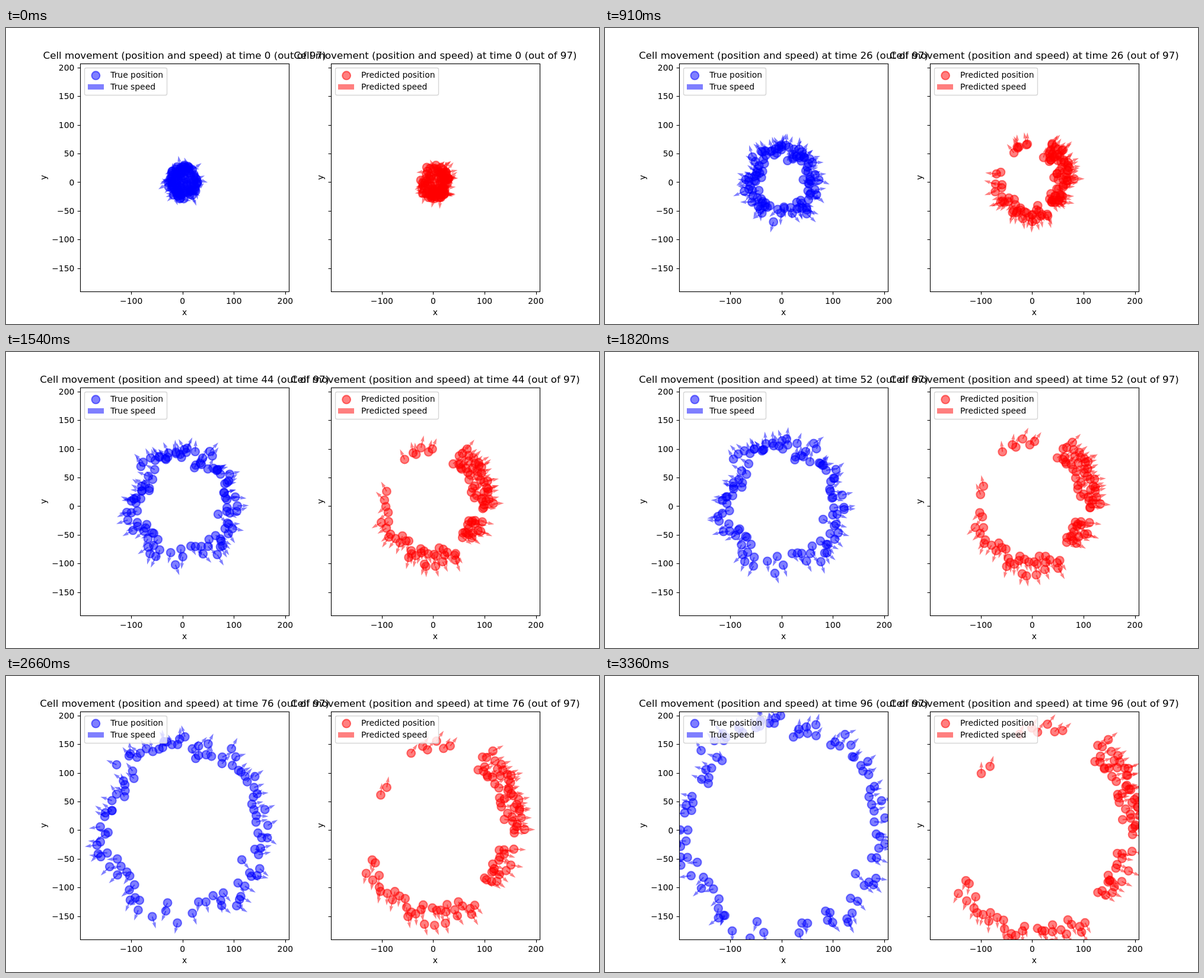
An HTML page with a canvas that plays this animation: 1000x500 px, repeating every 3390 ms.

```html
<!DOCTYPE html>
<html lang="en">
<head>
<meta charset="utf-8">
<title>Cell movement</title>
<style>
  html, body { margin: 0; width: 100%; height: 100%; overflow: hidden; background: #fff; }
  canvas { display: block; }
</style>
</head>
<body>
<canvas id="stage" width="1000" height="500"></canvas>
<script>
const ctx = document.getElementById('stage').getContext('2d');
const LOOP = 3390, STEP = 35, LAST = 96;
const REF = 67, SPEED = 1.88;             // sectors describe the swarm at step REF
const SX = 0.8655, SY = 0.9675, Y0 = 260.4;
const TOP = 60, BOTTOM = 445, WIDTH = 352.27;
const RAD = Math.PI / 180;

const panels = [
  {
    left: 125, x0: 297.7, rgb: '0,0,255', kind: 'True', legendWidth: 139, labels: true,
    seed: 7, wander: 0.35, heading: angle => angle,
    sectors: [
      { from: -65, to: 240, count: 93, near: 110, far: 156 },
      { from: -118, to: -67, count: 7, near: 112, far: 148 }
    ]
  },
  {
    left: 547.73, x0: 720.4, rgb: '255,0,0', kind: 'Predicted', legendWidth: 174, labels: false,
    seed: 21, wander: 0.12, heading: angle => angle > 0 ? 0.52 * angle : angle * (1 + angle / 8.4),
    sectors: [
      { from: -2, to: 56, count: 43, near: 122, far: 165 },
      { from: -42, to: -12, count: 17, near: 112, far: 152 },
      { from: -112, to: -58, count: 20, near: 112, far: 158 },
      { from: -164, to: -112, count: 13, near: 113, far: 142 },
      { from: 77, to: 115, count: 6, near: 128, far: 150 },
      { from: 143, to: 165, count: 2, near: 95, far: 125 }
    ]
  }
];

function randomizer(seed) {
  return () => {
    seed = seed + 0x6D2B79F5 | 0;
    let r = Math.imul(seed ^ seed >>> 15, 1 | seed);
    r = r + Math.imul(r ^ r >>> 7, 61 | r) ^ r;
    return ((r ^ r >>> 14) >>> 0) / 4294967296;
  };
}

function makeCells({ sectors, seed, heading, wander }) {
  const random = randomizer(seed);
  const spread = size => (random() * 2 - 1) * size;
  return sectors.flatMap(({ from, to, count, near, far }) => Array.from({ length: count }, (_, i) => {
    const angle = (from + (to - from) * (i + random()) / count) * RAD;
    const radius = near + (far - near) * random();
    const x = radius * Math.cos(angle), y = radius * Math.sin(angle);
    const course = heading(Math.atan2(y, x)) + spread(wander);
    const startAngle = angle + spread(2.2), startRadius = 30 * Math.sqrt(random());
    return {
      x, y,
      sx: 2 + startRadius * Math.cos(startAngle), sy: startRadius * Math.sin(startAngle),
      vx: SPEED * REF * Math.cos(course), vy: SPEED * REF * Math.sin(course),
      length: 19.5 + spread(2), phase: random() * 6.3, sway: wander
    };
  }));
}

// Curved departure from the start, then straight on from the anchor.
function along(start, anchor, speed, s) {
  if (s >= 1) return [anchor + speed * (s - 1), speed];
  const bend = speed - (anchor - start), launch = 2 * (anchor - start) - speed;
  return [start + launch * s + bend * s * s, launch + 2 * bend * s];
}

function disc(x, y) {
  ctx.beginPath();
  ctx.arc(x, y, 6.94, 0, Math.PI * 2);
  ctx.fill();
  ctx.stroke();
}

function arrow(x, y, angle, length) {
  const w = 1.05, neck = length - 9.5, barb = length - 10.6, head = 3.2;
  ctx.save();
  ctx.translate(x, y);
  ctx.rotate(-angle);
  ctx.beginPath();
  ctx.moveTo(0, -w);
  for (const [px, py] of [[neck, -w], [barb, -head], [length, 0], [barb, head], [neck, w], [0, w]]) ctx.lineTo(px, py);
  ctx.fill();
  ctx.restore();
}

function text(value, x, y, align = 'center', size = 13.89) {
  ctx.font = `${size}px "DejaVu Sans", sans-serif`;
  ctx.textAlign = align;
  ctx.fillStyle = '#000';
  ctx.fillText(value, x, Math.round(y));
}

function line(x1, y1, x2, y2) {
  ctx.beginPath();
  ctx.moveTo(x1, y1);
  ctx.lineTo(x2, y2);
  ctx.stroke();
}

const snap = v => Math.round(v) + 0.5;
const signed = v => String(v).replace('-', '\u2212');

function usePaint(panel) {
  ctx.fillStyle = ctx.strokeStyle = `rgba(${panel.rgb},0.5)`;
  ctx.lineWidth = 2.08;
}

function drawCells(panel, step) {
  ctx.save();
  ctx.beginPath();
  ctx.rect(panel.left, TOP, WIDTH, BOTTOM - TOP);
  ctx.clip();
  usePaint(panel);
  const poses = panel.cells.map(c => {
    const [x, vx] = along(c.sx, c.x, c.vx, step / REF);
    const [y, vy] = along(c.sy, c.y, c.vy, step / REF);
    const angle = Math.atan2(vy, vx) + c.sway * Math.sin(c.phase + step * 0.13);
    return [panel.x0 + x * SX, Y0 - y * SY, angle, c.length];
  });
  poses.forEach(([x, y]) => disc(x, y));
  poses.forEach(pose => arrow(...pose));
  ctx.restore();
}

function drawAxes({ left, x0, labels }) {
  const l = snap(left), r = snap(left + WIDTH), t = snap(TOP), b = snap(BOTTOM);
  ctx.strokeStyle = '#000';
  ctx.lineWidth = 1.11;
  ctx.strokeRect(l, t, r - l, b - t);
  for (const v of [-100, 0, 100, 200]) {
    const x = x0 + v * SX;
    line(snap(x), b, snap(x), b + 4.86);
    text(signed(v), x, 466);
  }
  for (let v = -150; v <= 200; v += 50) {
    const y = Y0 - v * SY;
    line(l, snap(y), l - 4.86, snap(y));
    if (labels) text(signed(v), 115.3, y + 5.2, 'right');
  }
  text('x', left + WIDTH / 2, 485);
  ctx.save();
  ctx.translate(labels ? 68 : 534.5, 252.5);
  ctx.rotate(-Math.PI / 2);
  text('y', 0, 0);
  ctx.restore();
}

function drawLegend(panel) {
  const { left, kind, legendWidth } = panel;
  ctx.beginPath();
  ctx.roundRect(snap(left + 6.9), 67.5, legendWidth, 46, 2.8);
  ctx.fillStyle = 'rgba(255,255,255,0.8)';
  ctx.strokeStyle = 'rgba(204,204,204,0.8)';
  ctx.lineWidth = 1.39;
  ctx.fill();
  ctx.stroke();
  usePaint(panel);
  disc(left + 26.4, 80.3);
  ctx.fillRect(Math.round(left + 12.5), 95, 27, 9);
  text(kind + ' position', left + 51.2, 84, 'left');
  text(kind + ' speed', left + 51.2, 104, 'left');
}

function draw(step) {
  ctx.fillStyle = '#fff';
  ctx.fillRect(0, 0, 1000, 500);
  for (const panel of panels) {
    drawCells(panel, step);
    drawAxes(panel);
    text(`Cell movement (position and speed) at time ${step} (out of 97)`, panel.left + WIDTH / 2, 52, 'center', 16.67);
    drawLegend(panel);
  }
}

panels.forEach(panel => panel.cells = makeCells(panel));
const begin = performance.now();
function tick() {
  const elapsed = (performance.now() - begin) % LOOP;
  draw(Math.min(LAST, Math.floor(elapsed / STEP)));
  requestAnimationFrame(tick);
}
tick();
</script>
</body>
</html>
```
